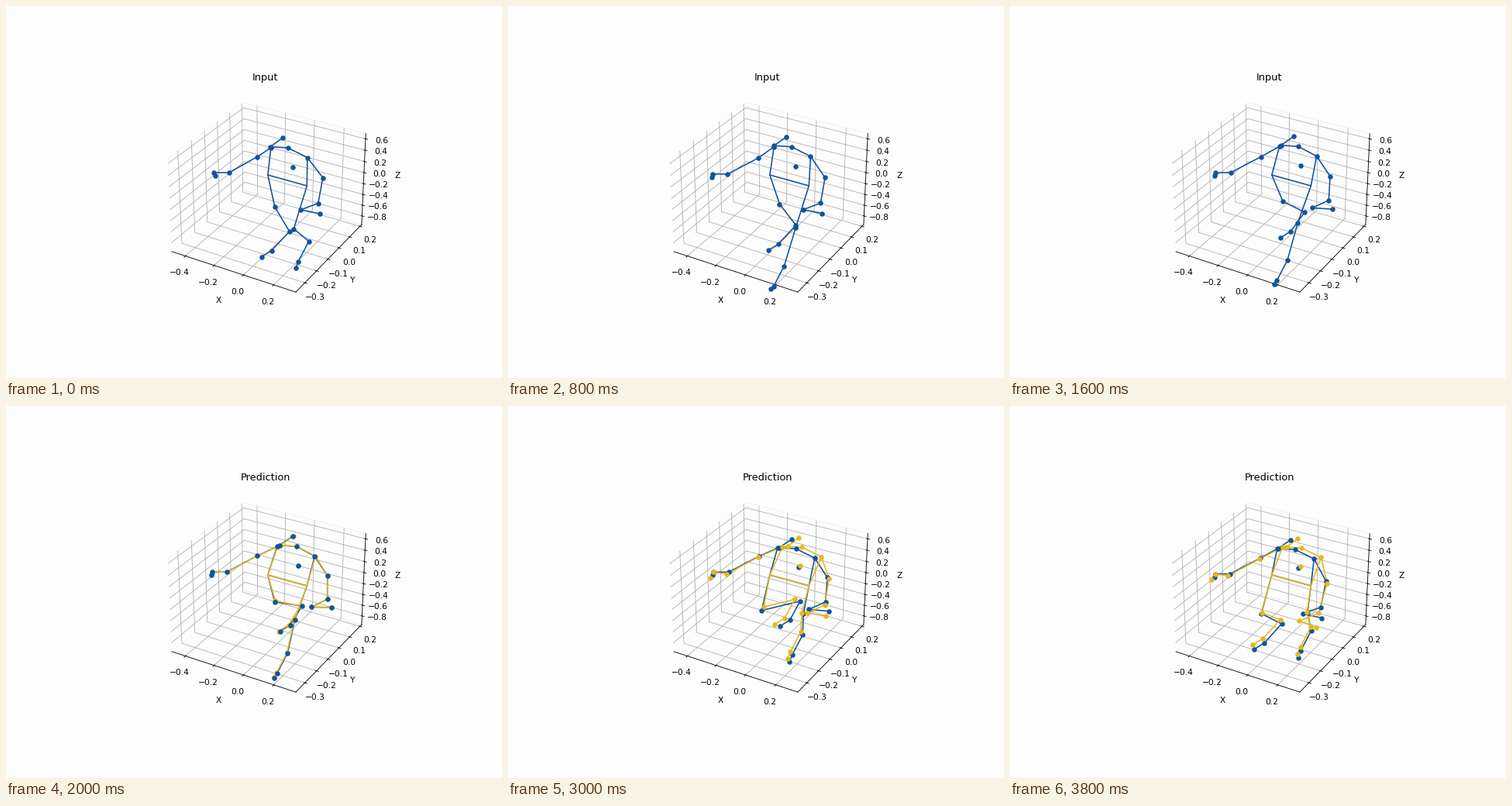
Write a matplotlib script that moves like this. It is 640 by 480 pixels and loops after 4 s.

```python
import matplotlib.pyplot as plt
import numpy as np
from matplotlib.animation import FuncAnimation

W, H, DPI = 640, 480, 100
FRAMES, INTERVAL = 20, 200
SWITCH = 10                      # first step with a prediction
K = 0.77                         # overall scale of text and strokes
BLUE, GOLD = "#10549c", "#e6b81c"

plt.rcParams.update({
    "font.family": "DejaVu Sans",
    "font.size": 10 * K,
    "axes.linewidth": 0.8 * K,
    "grid.linewidth": 0.8 * K,
    "grid.color": "#b0b0b0",
    "lines.linewidth": 1.5 * K,
    "patch.linewidth": 1.0 * K,
    "xtick.major.width": 0.8 * K,
    "ytick.major.width": 0.8 * K,
    # 3D axes add fixed 8 and 21 point offsets, scaled here as well
    "xtick.major.pad": 11.5 * K - 8,
    "ytick.major.pad": 11.5 * K - 8,
    "axes.labelpad": 25 * K - 21,
    "figure.facecolor": "#fdfdfd",
})

# ---------------------------------------------------------------- motion

# rest point, share of the body sway, share of the prediction error
BODY = {
    "head": (358, 170.5, 1.15, 1.03),
    "neck": (342, 182, 1.07, 1.3),
    "chest": (364.5, 183.5, 1, 0.9),
    "spine": (370.5, 208.5, 0.65, 0.25),
    "l_shoulder": (342.5, 183.5, 0.75, 0.75),
    "r_shoulder": (389.5, 196, 0.88, 1),
}
# rest point, reach to the left, share of the prediction error
LEFT_ARM = {
    "l_elbow": (325, 195, 2, 0.4),
    "l_wrist": (288.5, 215.5, 4.7, 0.8),
    "l_hand": (268.5, 215.5, 4, 0),
    "l_tip": (270.5, 219.5, 7, 1),
}
# rest point, swing along x and y, share of the prediction error
RIGHT_ARM = {
    "r_elbow": (409.5, 222, 0.4, -0.17, 0.2),
    "r_wrist": (403.5, 255, 0.8, -0.36, 0.6),
    "r_hand": (381, 263.5, 0.93, -0.24, 0.75),
    "r_tip": (405.5, 268.5, 1.03, -0.55, 1),
}


def ease(n, start, end):
    """Smooth step from 0 to 1 between two moments."""
    t = min(max((n - start) / (end - start), 0), 1)
    return t * t * (3 - 2 * t)


def bump(n, start, end):
    t = min(max((n - start) / (end - start), 0), 1)
    return np.sin(np.pi * t)


def add_body(p, n, err):
    sway = 14 * ease(n, 1, 14) - 10 * ease(n, 11, 18)
    rise, sink = 1.8 * ease(n, 0, 6), 4 * ease(n, 11, 17)
    lean = 9 * err * ease(n, 8.5, 16)
    lift = 1.9 * err * ease(n, 10, 16)
    for name, (x, y, share, off) in BODY.items():
        p[name] = (x + share * sway + off * lean,
                   y - rise + share * sink - lift)


def add_arms(p, n, err):
    sway = 14 * ease(n, 1, 14) - 10 * ease(n, 11, 18)
    reach = ease(n, 0, 3.5)
    wave = 1.8 * np.sin(2 * np.pi * n / 16)
    slip = 3.2 * err * ease(n, 9, 15)
    for name, (x, y, far, off) in LEFT_ARM.items():
        p[name] = (x - far * reach + 0.2 * sway - off * slip,
                   y + wave + off * slip)

    swing = 15.5 * ease(n, 3, 11) - 20 * ease(n, 11, 21)
    sink = 4.5 * ease(n, 12, 20)
    fall = err * ease(n, 9.5, 21)
    lean = 3.6 * err * ease(n, 8.5, 16)
    for name, (x, y, gx, gy, off) in RIGHT_ARM.items():
        p[name] = (x + gx * swing - 8 * off * fall + (1 - off) * lean,
                   y + gy * swing + sink + 13.5 * off * fall)


def add_legs(p, n, err):
    p["l_hip"], p["r_hip"] = (338.5, 218.5), (389, 232.5)
    slip = err * bump(n, 9, 20)

    p["l_knee"] = (347.5 + 6 * ease(n, 0, 7) - 28.5 * ease(n, 7, 17)
                   + 2.7 * slip,
                   259.5 - 7 * ease(n, 0, 8) + 16 * ease(n, 9, 18)
                   - 4.5 * slip)
    x = 366.5 + 16 * ease(n, 0, 10) - 55 * ease(n, 13, 24) - 7 * slip
    y = 291.5 - 41 * ease(n, 0, 14) + 62 * ease(n, 14, 24)
    heel = -13 - 0.3 * min(max(y - 251, 0), 34)    # turns as it sinks
    y -= 5.5 * err * ease(n, 11, 20)
    p["l_ankle"] = (x, y)
    p["l_heel"] = (x + heel, y + 24.5)
    p["l_toe"] = (x + heel - 13, y + 32.5)

    p["r_knee"] = (372 + 12.5 * ease(n, 8, 18) - 2 * slip,
                   288 - 21 * ease(n, 1, 18) - err * ease(n, 8, 17))
    x = 428 - 73 * ease(n, -5, 5) + 35 * ease(n, 5, 20) - 2.5 * slip
    y = 270 + 68 * ease(n, -5, 5) - 48 * ease(n, 4, 18)
    toe = 9 - 0.17 * max(y - 303, 0)               # flattens when low
    y -= 4.3 * err * ease(n, 8, 17)
    p["r_ankle"] = (x, y)
    p["r_heel"] = (x - 13.5, y + 26)
    p["r_toe"] = (x - 17, y + 26 + toe)


def pose(n, err):
    """All joints at a step; err 1 adds the error of the prediction."""
    p = {}
    for part in (add_body, add_arms, add_legs):
        part(p, n, err)
    return p


def side(prefix, parts):
    return [prefix + part for part in parts.split()]


ARM = "shoulder elbow wrist hand tip"
LEG = "shoulder hip knee ankle heel toe"
CHAINS = [
    ["neck"] + side("l_", ARM),
    ["head", "neck", "chest"] + side("r_", ARM),
    side("l_", LEG),
    side("r_", LEG),
    ["l_hip", "r_hip"],
]
DOTS = [name for name in pose(0, 0) if not name.endswith("hip")]

# ---------------------------------------------------------------- stage

fig = plt.figure(figsize=(W / DPI, H / DPI), dpi=DPI)

SIZE, CX, CY = 284.6, 334.9, 244.8
ax = fig.add_axes([(CX - SIZE / 2) / W, 1 - (CY + SIZE / 2) / H,
                   SIZE / W, SIZE / H], projection="3d")
ax.set_facecolor("none")
ax.view_init(elev=30, azim=-60)
ax.set_xticks([k / 10 for k in range(-4, 3, 2)])
ax.set_yticks([k / 10 for k in range(-3, 3)])
ax.set_zticks([k / 10 for k in range(-8, 7, 2)])
ax.set_xlim(-0.4956, 0.343)
ax.set_ylim(-0.375, 0.217)
ax.set_zlim(-0.963, 0.694)
ax.set_xlabel("X")
ax.set_ylabel("Y")
ax.set_zlabel("Z")
for axis in (ax.xaxis, ax.yaxis, ax.zaxis):
    axis.pane.fill = False
title = ax.set_title("Input", y=1.0, pad=6 * K)
title.set_y(1.0)                 # 3D axes lower it by default

top = fig.add_axes([0, 0, 1, 1], zorder=5)
top.set_xlim(0.7, W + 0.7)
top.set_ylim(H + 0.5, 0.5)
top.axis("off")


class Skeleton:
    def __init__(self, color, err, z):
        self.err = err
        self.lines = [top.plot([], [], color=color, zorder=z)[0]
                      for _ in CHAINS]
        self.dots = top.plot([], [], "o", color=color, ms=4.7, mew=0)[0]

    def show(self, n, visible, z):
        p = pose(n, self.err)
        for line, names in zip(self.lines + [self.dots], CHAINS + [DOTS]):
            line.set_data(*zip(*(p[name] for name in names)))
            line.set_visible(visible)
        self.dots.set_zorder(z)


actual = Skeleton(BLUE, 0, 2)
predicted = Skeleton(GOLD, 1, 3)


def draw(n):
    predicting = n >= SWITCH
    title.set_text("Prediction" if predicting else "Input")
    actual.show(n, True, 6 if n < 14 else 4)
    predicted.show(n, predicting, 5)
    return []


anim = FuncAnimation(fig, draw, frames=FRAMES, interval=INTERVAL,
                     repeat=True, repeat_delay=0, blit=False)
plt.show()
```
